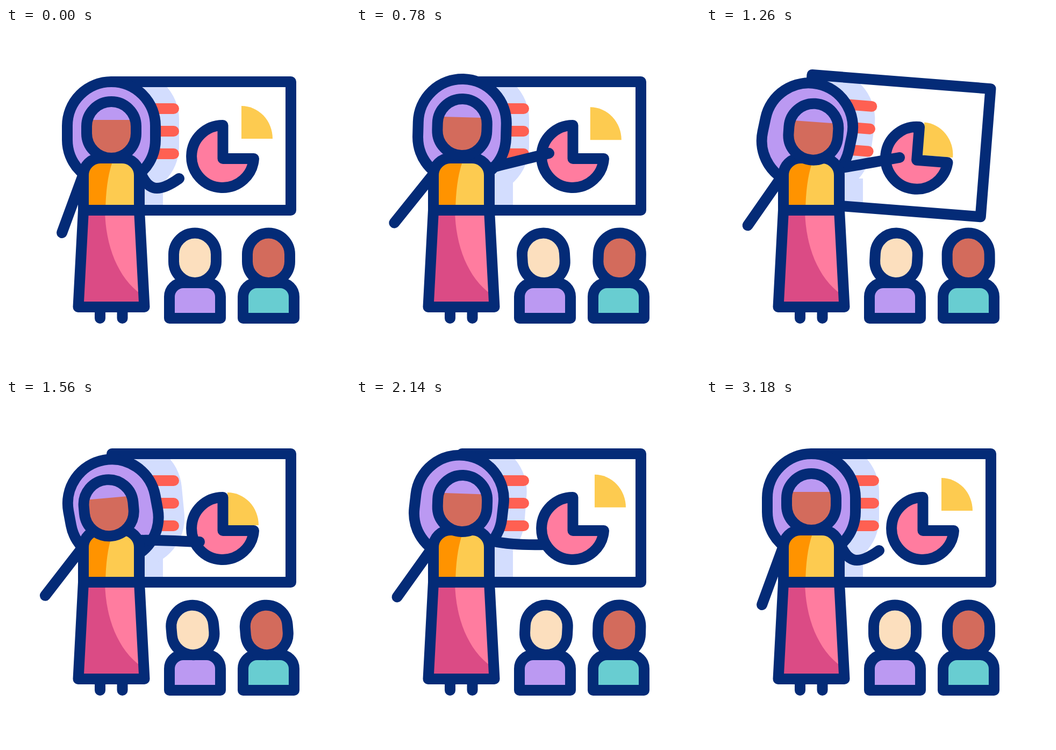
These frames come from a looping animation (640 px wide and 640 px high, 3.6 s). An HTML page:

```html
<!DOCTYPE html>
<html lang="en">
<head>
<meta charset="utf-8">
<title>Presentation</title>
<style>
  html, body { margin: 0; width: 100%; height: 100%; overflow: hidden; background: #fff; }
  svg { display: block; width: 100vw; height: 100vh; }
  .line { stroke: #042b77; stroke-width: 20; stroke-linejoin: round; stroke-linecap: round; fill: none; }
  .lilac { fill: #bb99f2; }
  .skin { fill: #d36b5c; }
  .yellow { fill: #fdcb50; }
  .pink { fill: #ff7c9f; }
</style>
</head>
<body>
<svg viewBox="0 0 640 640">
  <defs>
    <clipPath id="boardClip"><rect id="clipRect" x="197" y="100" width="333" height="239"/></clipPath>
    <clipPath id="faceClip"><rect x="150" y="137" width="92" height="105" rx="46"/></clipPath>
    <path id="kidBody" d="M304 540V500a26 26 0 0 1 26-26H373a26 26 0 0 1 26 26V540Z"/>
    <rect id="kidHead" x="312" y="381.5" width="79" height="92.5" rx="39.5"/>
  </defs>

  <g clip-path="url(#boardClip)" fill="#d3ddfe">
    <rect x="190" y="280" width="102" height="80"/>
    <rect id="shadow" x="138" y="78" width="184" height="234" rx="92"/>
  </g>

  <g id="board">
    <path d="M250 150H312M250 192H312M250 234H312" stroke="#ff6052" stroke-width="20" stroke-linecap="round"/>
    <rect class="line" x="197" y="100" width="333" height="239"/>
    <path id="slice" class="yellow" d="M438 206V145A58 61 0 0 1 496 206Z"/>
    <path class="line" style="fill:#ff7c9f" d="M403.5 181V243H461A58 58 0 1 1 403.5 181Z"/>
  </g>

  <g id="hairBob"><rect id="hair" class="line" style="fill:#bb99f2" x="114" y="100" width="164" height="190" rx="82"/></g>

  <path id="leftArm" class="line" d="M144 272L104 381"/>
  <path id="rightArm" class="line"/>
  <path class="line" d="M175 525V540M216.500 525V540"/>

  <path fill="#ff9300" d="M144 339V274a32 32 0 0 1 32-32H216a32 32 0 0 1 32 32V339Z"/>
  <path class="yellow" d="M197 252Q186 285 185 339H248V274a32 32 0 0 0-32-32H198Z"/>
  <path fill="#db4b85" d="M144 339H248L257.500 519H134.500Z"/>
  <path class="pink" d="M184 339C185 405 208 465 252 496L248 339Z"/>
  <path class="line" d="M144 339V274a32 32 0 0 1 32-32H216a32 32 0 0 1 32 32V339ZL134.500 519H257.500L248 339"/>

  <g id="head">
    <g clip-path="url(#faceClip)">
      <rect class="skin" x="146" y="130" width="100" height="120"/>
      <rect class="lilac" x="146" y="130" width="100" height="41"/>
    </g>
    <rect class="line" x="150" y="137" width="92" height="105" rx="46"/>
  </g>

  <use href="#kidBody" class="line" style="fill:#bb99f2"/>
  <g id="kid1"><use href="#kidHead" class="line" style="fill:#fcdfbe"/></g>
  <g transform="translate(137)">
    <use href="#kidBody" class="line" style="fill:#68cdd1"/>
    <g id="kid2"><use href="#kidHead" class="line" style="fill:#d36b5c"/></g>
  </g>
</svg>
<script>
const LOOP = 3600, FRAME = 20;
const $ = id => document.getElementById(id);
const BEATS = [0, 780, 1260, 1560, 2140, 2620, 3180];

// Smooth curve through the keys, at rest at both ends.
function track(values, times = BEATS) {
  const last = times.length - 1;
  const slope = i => i === 0 || i === last ? 0
    : (values[i + 1] - values[i - 1]) / (times[i + 1] - times[i - 1]);
  return t => {
    if (t >= times[last]) return values[last];
    let i = 0;
    while (t >= times[i + 1]) i++;
    const d = times[i + 1] - times[i], u = (t - times[i]) / d, v = 1 - u;
    return v * v * ((1 + 2 * u) * values[i] + u * d * slope(i))
         + u * u * ((3 - 2 * u) * values[i + 1] - v * d * slope(i + 1));
  };
}

// Eased move between two values.
const ease = (t, from, to) => {
  const u = Math.min(1, Math.max(0, (t - from) / (to - from)));
  return u * u * (3 - 2 * u);
};

const headTilt = track([0, 1.6, 4, -5, 2, -3, 0]);
const hairTilt = track([0, 0, 8, -5.5, 4.5, -5, 0]);
const headBob = track([0, 5, -5, -14, 3.5, 11, -5, 3, 4, 0],
  [0, 400, 780, 910, 1260, 1560, 1850, 2140, 2620, 3180]);
const leftSwing = track([0, 21, 18.6, 14.7, 17.6, 21, 15.4, 5.8, 0],
  [0, 550, 780, 1260, 1560, 1800, 2140, 2620, 3180]);
const kid1Tilt = track([0, -3.2, 3, -5, 2.9, -1.8, 0]);
const kid2Tilt = track([0, 2, -0.4, -4.5, 1.5, -1.6, 0]);

// Right arm: two control points and the hand, as x and y tracks.
const ARM_TIMES = [0, 560, ...BEATS.slice(1)];
const arm = [
  [262, 278, 280, 283, 285, 278, 262, 262],
  [302, 256, 252, 255, 260, 269, 303, 302],
  [280, 316, 320, 320, 323, 315, 282, 280],
  [310, 248, 243, 248, 263, 270, 310, 310],
  [322, 354, 359, 360, 360, 353, 326, 322],
  [280, 238, 233, 241, 264, 269, 278, 280]
].map(v => track(v, ARM_TIMES));

const boardTilt = t => 4.5 * ease(t, 1080, 1250) - 7.6 * ease(t, 1260, 1400) + 3.1 * ease(t, 1400, 1540);
const sliceOut = t => 1 - ease(t, 730, 1010) + 1.23 * ease(t, 1840, 2130) - 0.23 * ease(t, 2140, 2380);

const rot = (a, x, y) => `rotate(${a} ${x} ${y})`;
const move = (id, transform) => $(id).setAttribute("transform", transform);

function draw(t) {
  const swing = rot(boardTilt(t), 363, 100);
  move("board", swing);
  move("clipRect", swing);
  const gap = sliceOut(t) - 1;
  move("slice", `translate(${26 * gap} ${-27 * gap})`);

  const head = `translate(0 ${headBob(t)}) ${rot(headTilt(t), 196, 245)}`;
  move("head", head);
  move("hairBob", head);
  move("hair", rot(hairTilt(t), 196, 115));
  move("shadow", rot(hairTilt(t), 230, 115));

  move("leftArm", rot(leftSwing(t), 144, 272));
  $("rightArm").setAttribute("d", "M247 261C" + arm.map(f => f(t).toFixed(2)).join(" "));
  move("kid1", rot(kid1Tilt(t), 351.5, 475));
  move("kid2", rot(kid2Tilt(t), 351.5, 475));
}

const start = performance.now();
function tick() {
  const t = Math.max(0, performance.now() - start) % LOOP;
  draw(Math.floor(t / FRAME) * FRAME);
  requestAnimationFrame(tick);
}
tick();
</script>
</body>
</html>
```
